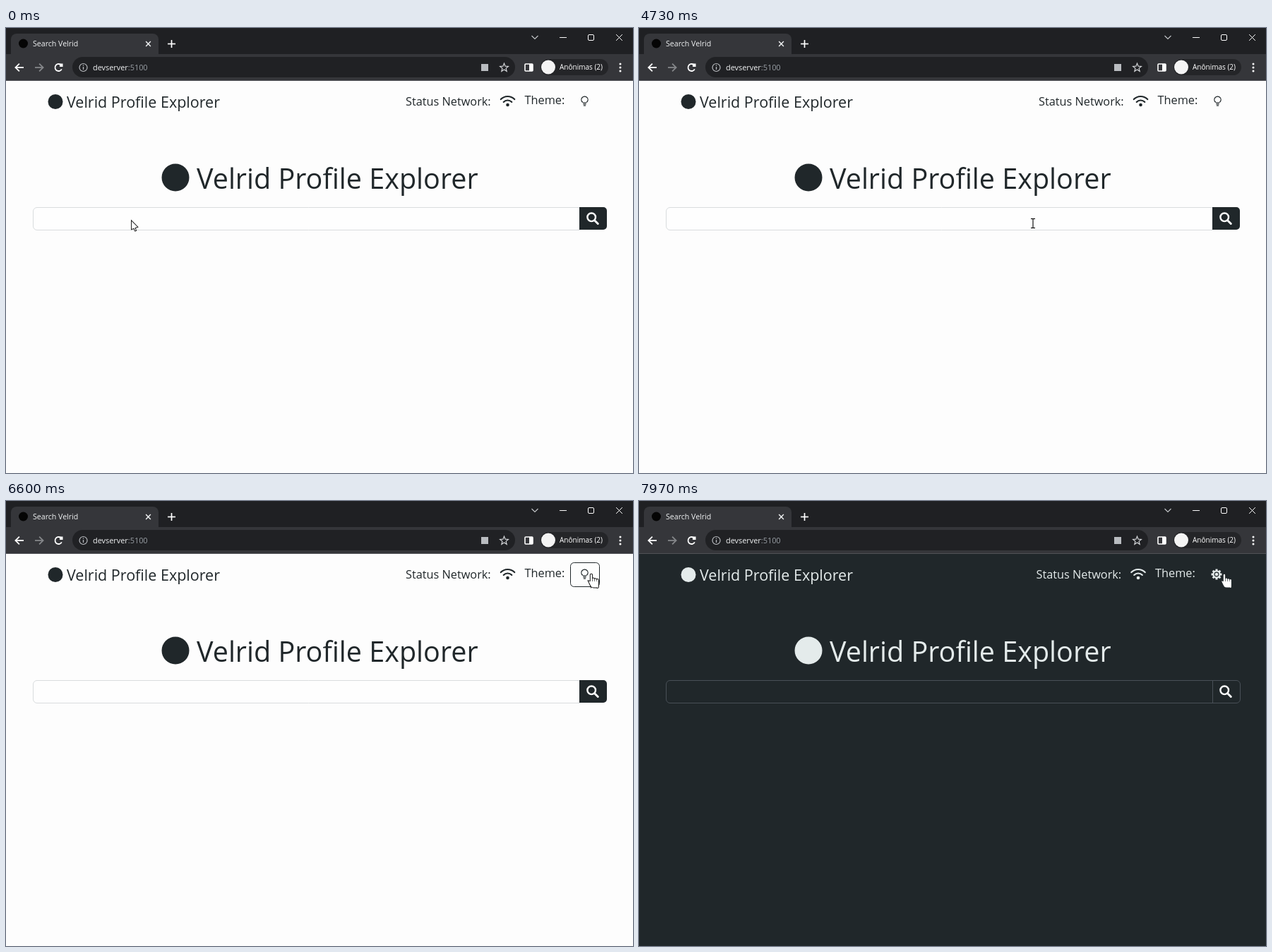
An HTML page with a canvas that plays this animation: 888x631 px, repeating every 8000 ms.

```html
<!DOCTYPE html>
<html lang="en">
<head>
<meta charset="utf-8">
<title>Search Velrid</title>
<style>
html, body { margin: 0; width: 100%; height: 100%; overflow: hidden; background: #fdfdfd; }
canvas { display: block; width: 888px; height: 631px; }
</style>
</head>
<body>
<canvas id="stage" width="888" height="631"></canvas>
<script>
const c = document.getElementById('stage').getContext('2d');
const LOOP = 8000, TURN = Math.PI * 2, UP = -Math.PI / 2;
const FOCUS = 5330, PRESS = 6340, TOGGLE = 6640, BLINK = 530;
const INK = '#20272a', PAPER = '#fdfdfd', PALE = '#e4ebeb';
const BAR = '#35363a', DEEP = '#202124', WHITE = '#ffffff', SOFT = '#b9bcc0';
const NAME = 'Velrid Profile Explorer';

const HOME = { x: 177, y: 272 };
const GLIDES = [
  { at: 1590, time: 40, x: 235, y: 267 },
  { at: 3600, time: 1800, x: 704, y: 282 },
  { at: 5800, time: 140, x: 829, y: 103 }
];

function progress(t, start, length) {
  const v = Math.max(0, Math.min(1, (t - start) / length));
  return v * v * (3 - 2 * v);
}

function mix(a, b, k) {
  const channel = (s, i) => parseInt(s.slice(1 + 2 * i, 3 + 2 * i), 16);
  return `rgb(${[0, 1, 2].map(i => Math.round(channel(a, i) * (1 - k) + channel(b, i) * k))})`;
}

function pointerAt(t) {
  let { x, y } = HOME;
  for (const g of GLIDES) {
    const k = progress(t, g.at, g.time);
    x += (g.x - x) * k;
    y += (g.y - y) * k;
  }
  return { x: Math.round(x), y: Math.round(y) };
}

function text(s, x, y, size, color) {
  c.font = `${size}px "Open Sans", "Noto Sans", sans-serif`;
  c.fillStyle = color;
  c.fillText(s, x, y);
  return x + c.measureText(s).width;
}

function rect(x, y, w, h, color) {
  c.fillStyle = color;
  c.fillRect(x, y, w, h);
}

function box(x, y, w, h, r, fill, stroke, width = 1) {
  c.beginPath();
  c.roundRect(x, y, w, h, r);
  if (fill) { c.fillStyle = fill; c.fill(); }
  if (stroke) outline(stroke, width);
}

function outline(color, width) {
  c.strokeStyle = color;
  c.lineWidth = width;
  c.stroke();
}

function disc(x, y, r, color) {
  c.beginPath();
  c.arc(x, y, r, 0, TURN);
  c.fillStyle = color;
  c.fill();
}

function arc(x, y, r, from, to, color, width) {
  c.beginPath();
  c.arc(x, y, r, from, to);
  outline(color, width);
}

const ring = (x, y, r, color, width) => arc(x, y, r, 0, TURN, color, width);

function line(x1, y1, x2, y2, color, width) {
  c.beginPath();
  c.moveTo(x1, y1);
  c.lineTo(x2, y2);
  outline(color, width);
}

// Evenly spaced diameters: two make a plus or a cross, four make gear teeth.
function spokes(x, y, r, count, turn, color, width) {
  for (let i = 0; i < count; i++) {
    const a = turn + i * Math.PI / count, dx = r * Math.cos(a), dy = r * Math.sin(a);
    line(x - dx, y - dy, x + dx, y + dy, color, width);
  }
}

// Open arrowhead with its tip at x, y; dx and dy reach back to the ends.
function chevron(x, y, dx, dy, color, width) {
  c.beginPath();
  c.moveTo(x + dx, y + dy);
  c.lineTo(x, y);
  if (Math.abs(dx) > Math.abs(dy)) c.lineTo(x + dx, y - dy);
  else c.lineTo(x - dx, y + dy);
  outline(color, width);
}

function navArrow(x, dir, color) {
  const tip = x + dir * 5.8;
  line(x - dir * 5.8, 56, tip, 56, color, 1.8);
  chevron(tip, 56, -dir * 5.5, 5.4, color, 1.8);
}

function drawTabs() {
  rect(0, 0, 888, 37, '#1f2023');
  box(7, 8, 209, 40, 8, BAR);
  rect(0, 37, 888, 37, BAR);
  rect(0, 74, 888, 1, '#505256');
  disc(24.5, 22, 6.5, '#050505');
  text('Search Velrid', 38, 26, 10.6, '#f1f3f4');
  spokes(201.5, 22.5, 4.8, 2, Math.PI / 4, '#f1f3f4', 1.4);
  spokes(234.5, 22.5, 5.5, 2, 0, WHITE, 1.7);
  chevron(749, 15.5, 4.5, -4.5, '#c4c7c9', 1.1);
  line(784, 13.5, 794, 13.5, WHITE, 1);
  box(824.5, 9.5, 8, 8, 1.5, null, WHITE);
  spokes(868.5, 13.5, 6.2, 2, Math.PI / 4, WHITE, 1);
}

function drawToolbar() {
  navArrow(19.2, -1, WHITE);
  navArrow(46.8, 1, '#85878a');
  arc(74.5, 56, 5, 0.5, 5.5, WHITE, 1.8);
  rect(76, 50.5, 4.5, 4.5, WHITE);

  box(94, 41, 627, 29, 14.5, DEEP);
  ring(109.5, 56, 5.5, SOFT, 1.2);
  line(109.5, 55, 109.5, 59, SOFT, 1.3);
  disc(109.5, 53, 0.8, SOFT);
  const port = text('devserver', 123, 60, 10.9, '#f1f3f4');
  text(':5100', port, 60, 10.9, '#9aa0a6');
  rect(673, 51, 10, 10, SOFT);

  c.beginPath();
  for (let i = 0; i < 10; i++) {
    const a = UP + i * TURN / 10, r = i % 2 ? 2.7 : 6.2;
    c.lineTo(705.5 + r * Math.cos(a), 56.3 + r * Math.sin(a));
  }
  c.closePath();
  outline('#d3d5d8', 1.2);

  box(735, 51, 11, 10, 1, null, WHITE, 1.6);
  rect(741, 51, 5, 10, WHITE);
  box(757, 44, 96, 23, 11.5, '#242528');
  disc(768, 55.5, 10, '#f4f4f4');
  text('Anônimas (2)', 784, 59, 10, WHITE);
  for (let i = -1; i < 2; i++) disc(870, 56 + 5 * i, 1.5, WHITE);
}

function drawWifi(x, color) {
  c.lineCap = 'round';
  for (const r of [8, 13.5]) arc(x, 110.5, r, UP - 0.8, UP + 0.8, color, 2.2);
  c.lineCap = 'butt';
  disc(x, 109, 2.3, color);
}

function drawBulb(color) {
  arc(819.5, 101.7, 4.6, UP - 2.5, UP + 2.5, color, 1.3);
  for (let i = 0; i < 3; i++) line(816.9 + i / 2, 106 + 2 * i, 822.1 - i / 2, 106 + 2 * i, color, 1.2);
}

function drawGear(color) {
  spokes(818, 104, 7.5, 4, 0, color, 3);
  disc(818, 104, 5.7, color);
  ring(818, 104, 2.9, INK, 1.1);
}

function drawPage(t, dark, settle) {
  const shift = dark ? -3.5 : 0;
  const label = dark ? PALE : INK;
  const heading = mix(INK, PALE, settle);
  rect(0, 75, 888, 556, dark ? INK : PAPER);

  disc(70, 104.5, 10.5, heading);
  text(NAME, 86, 113, 21.5, heading);
  text('Status Network:', 566 + shift, 110, 16.3, label);
  drawWifi(710.5 + shift, label);
  text('Theme:', 734.5 + shift, 108, 16.3, label);
  if (dark) {
    drawGear(heading);
  } else {
    const hover = progress(t, 5880, 100);
    if (hover) box(799.5, 87.5, 41, 34, 5, null, mix(PAPER, INK, hover));
    drawBulb(INK);
  }

  disc(240, 212, 19.5, heading);
  text(NAME, 270, 227.5, 39.5, heading);
}

function drawSearch(t, dark, settle) {
  const focus = progress(t, FOCUS, 150) * (1 - progress(t, PRESS, 150));
  if (dark) {
    const edge = mix(WHITE, '#495057', settle);
    box(38.5, 254.5, 813, 32, 5.5, null, edge);
    line(812.5, 254, 812.5, 287, edge, 1);
  } else {
    if (focus) box(37, 252.5, 777, 36, 7, null, `rgba(13,110,253,${0.25 * focus})`, 3);
    box(38.5, 254.5, 774, 32, [5.5, 0, 0, 5.5], '#fefefe', mix('#d9dcde', '#86b7fe', focus));
    box(812, 254, 39, 32, [0, 5, 5, 0], INK);
    if (focus) rect(812, 254, 3, 32, `rgba(13,110,253,${0.5 * focus})`);
  }
  ring(829.2, 268.3, 5.8, WHITE, 2.4);
  c.lineCap = 'round';
  line(833.8, 273, 838.3, 277.5, WHITE, 2.9);
  c.lineCap = 'butt';
  const blinkOn = Math.floor((t - FOCUS) / BLINK) % 2 === 0;
  if (t >= FOCUS && t < PRESS && blinkOn) line(49.5, 261, 49.5, 279, INK, 1);
}

// Outlines every part, then fills them all, so overlaps merge into one shape.
function merged(parts, color) {
  for (const part of parts) {
    c.strokeStyle = color;
    c.lineWidth = 2;
    c.stroke(part);
  }
  c.fillStyle = WHITE;
  for (const part of parts) c.fill(part);
}

function bar(x, y, w, h, r) {
  const path = new Path2D();
  path.roundRect(x, y, w, h, r);
  return path;
}

function drawArrow() {
  const head = new Path2D('M1 2V13L9 10Z');
  const tail = new Path2D('M3.5 10L6 15.5L7 15L4.5 9.5Z');
  merged([head, tail], '#222');
}

function drawHand(color) {
  const fingers = [0, 1, 2, 3].map(i => bar(-1.2 + 2.9 * i, i ? 5.7 + 0.8 * i : 0.8, 2.3, 12, 1.2));
  const palm = bar(-1, 11, 10.4, 8.5, [0, 0, 3, 4]);
  const thumb = new Path2D('M-4 10.5L-1 11V17Z');
  merged([...fingers, palm, thumb], color);
}

function drawBeam() {
  line(0, -6.5, 0, 6.5, '#111', 1.2);
  for (const y of [-6.5, 6.5]) line(-3, y, 3, y, '#111', 1.2);
}

function drawPointer(t, dark) {
  const { x, y } = pointerAt(t);
  c.save();
  c.translate(x, y);
  if (y < 125) drawHand(dark ? INK : '#111');
  else if (t > GLIDES[1].at + 40 && y > 253) drawBeam();
  else drawArrow();
  c.restore();
}

function render(t) {
  const dark = t >= TOGGLE;
  const settle = progress(t, TOGGLE + 30, 320);
  drawTabs();
  drawToolbar();
  drawPage(t, dark, settle);
  drawSearch(t, dark, settle);
  drawPointer(t, dark);
}

const start = performance.now();
function tick() {
  render((performance.now() - start) % LOOP);
  requestAnimationFrame(tick);
}
tick();
</script>
</body>
</html>
```
